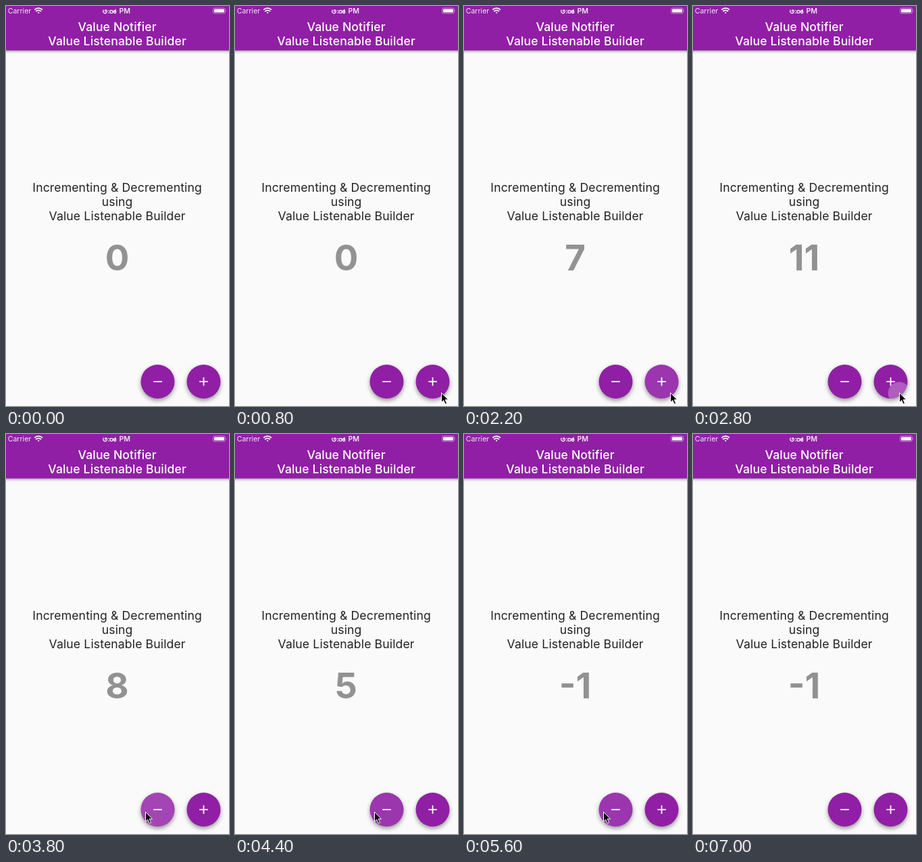
These frames come from a looping animation (330 px wide and 590 px high, 7.7 s). An HTML page:

```html
<!DOCTYPE html>
<html lang="en">
<head>
<meta charset="utf-8">
<title>Counter</title>
<style>
  html, body { margin: 0; width: 100%; height: 100%; overflow: hidden; background: #fafafa; }
  svg { display: block; width: 330px; height: 590px; }
  text { font-family: Inter, "Liberation Sans", sans-serif; text-anchor: middle; }
  .title { font-size: 17.6px; font-weight: 500; letter-spacing: .13px; fill: #fff; }
  .body { font-size: 17.6px; letter-spacing: .13px; fill: #222; }
  .status { font-size: 10.6px; fill: #f3e6f5; }
  .bar { fill: #901fa5; filter: drop-shadow(0 1.5px 2px #0007); }
  .fab { fill: #901fa5; filter: drop-shadow(0 3px 3px #0006); }
  .line { fill: none; stroke: #fff; }
  #count { font-size: 52.8px; font-weight: 700; fill: #929292; }
</style>
</head>
<body>
<svg viewBox="0 0 330 590">
  <clipPath id="minusClip"><circle cx="224.5" cy="554" r="25"/></clipPath>
  <clipPath id="plusClip"><circle cx="292.5" cy="554" r="25"/></clipPath>

  <rect width="330" height="590" fill="#fafafa"/>
  <rect class="bar" x="-10" y="-10" width="350" height="75.5"/>

  <text class="status" x="20" y="11">Carrier</text>
  <g class="line" stroke-width="1.8">
    <path d="M42.3 5.6a8.2 8.2 0 0 1 11.6 0M44.3 8a5.4 5.4 0 0 1 7.6 0"/>
    <path d="M46.6 9.6a2.2 2.2 0 0 1 3 0l-1.5 1.7z" fill="#fff" stroke="none"/>
  </g>
  <!-- Bengali clock digits -->
  <g class="line" stroke-width="1.2">
    <path d="M144.3 5.6c-1.4 3 0 5.2 2.4 5.2c2.8 0 3.6-4.6 1.3-5c-1.6-.2-1.9 2.2-.2 2.5"/>
    <path d="M152 6v1.4M152 9.5v1.4"/>
    <circle cx="156" cy="8.4" r="2.1"/>
    <path d="M160.3 8.6c1.5.3 1.6-2 .2-2.1c-1.8 0-1.5 3.7.4 4.2c2 .5 2.4-2.4.7-6"/>
  </g>
  <text class="status" x="175.8" y="11" font-weight="600">PM</text>
  <rect class="line" x="306.5" y="3" width="18" height="8" rx="2.2" stroke-opacity=".5" stroke-width=".9"/>
  <rect x="308" y="4.5" width="15" height="5" rx="1" fill="#fff"/>
  <path d="M325.6 5.6q1.4 1.4 0 2.8z" fill="#fff" fill-opacity=".6"/>

  <text class="title" x="164.6" y="36.5">Value Notifier</text>
  <text class="title" x="164.6" y="57.8">Value Listenable Builder</text>
  <text class="body" x="164.6" y="273.5">Incrementing &amp; Decrementing</text>
  <text class="body" x="164.6" y="294.8">using</text>
  <text class="body" x="164.6" y="316.1">Value Listenable Builder</text>
  <text id="count" x="164.5" y="390">0</text>

  <circle class="fab" cx="224.5" cy="554" r="25"/>
  <circle class="fab" cx="292.5" cy="554" r="25"/>
  <g clip-path="url(#minusClip)"><circle id="minusRipple" cx="207" cy="558" fill="#fff"/></g>
  <g clip-path="url(#plusClip)"><circle id="plusRipple" cx="305" cy="571" fill="#fff"/></g>
  <path class="line" stroke-width="1.8" d="M218.3 554h12.4M286.3 554h12.4M292.5 547.8v12.4"/>

  <path id="cursor" fill="#000" stroke="#fff" stroke-width="1"
        d="M.5.5v14.2l3.2-3 2.5 5.6 2.4-1.1-2.5-5.4h4.5z"/>
</svg>
<script>
const LOOP = 7700, STEP = 100;
const plusTaps = [900, 1090, 1270, 1470, 1660, 1850, 2050, 2250, 2410, 2580, 2759];
const minusTaps = [3400, 3540, 3694, 3880, 4070, 4250, 4440, 4630, 4800, 4960, 5250, 5450];
const el = id => document.getElementById(id);

function tapsBefore(taps, t) {
  return taps.filter(tap => tap <= t);
}

function drawRipple(circle, done, t) {
  const age = done.length ? t - done[done.length - 1] : Infinity;
  const alpha = Math.max(0, .34 - .0016 * age);
  circle.setAttribute("r", alpha ? .4 * age : 0);
  circle.setAttribute("opacity", alpha);
}

function glide(t, start, end, from, to) {
  const p = Math.min(1, Math.max(0, (t - start) / (end - start)));
  const eased = p * p * (3 - 2 * p);
  return from.map((v, i) => v + (to[i] - v) * eased);
}

function drawCursor(t) {
  const [x, y] = t < 3100
    ? glide(t, 300, 800, [318, 591], [305, 570])
    : glide(t, 3150, 3390, [305, 570], [206, 557]);
  el("cursor").setAttribute("transform", `translate(${x} ${y})`);
  el("cursor").setAttribute("visibility", t >= 300 && t < 5900 ? "visible" : "hidden");
}

function draw(now) {
  const t = Math.floor((now % LOOP) / STEP) * STEP;
  const ups = tapsBefore(plusTaps, t), downs = tapsBefore(minusTaps, t);
  el("count").textContent = ups.length - downs.length;
  drawRipple(el("plusRipple"), ups, t);
  drawRipple(el("minusRipple"), downs, t);
  drawCursor(t);
}

const start = performance.now();
function tick() {
  draw(performance.now() - start);
  requestAnimationFrame(tick);
}
tick();
</script>
</body>
</html>
```
